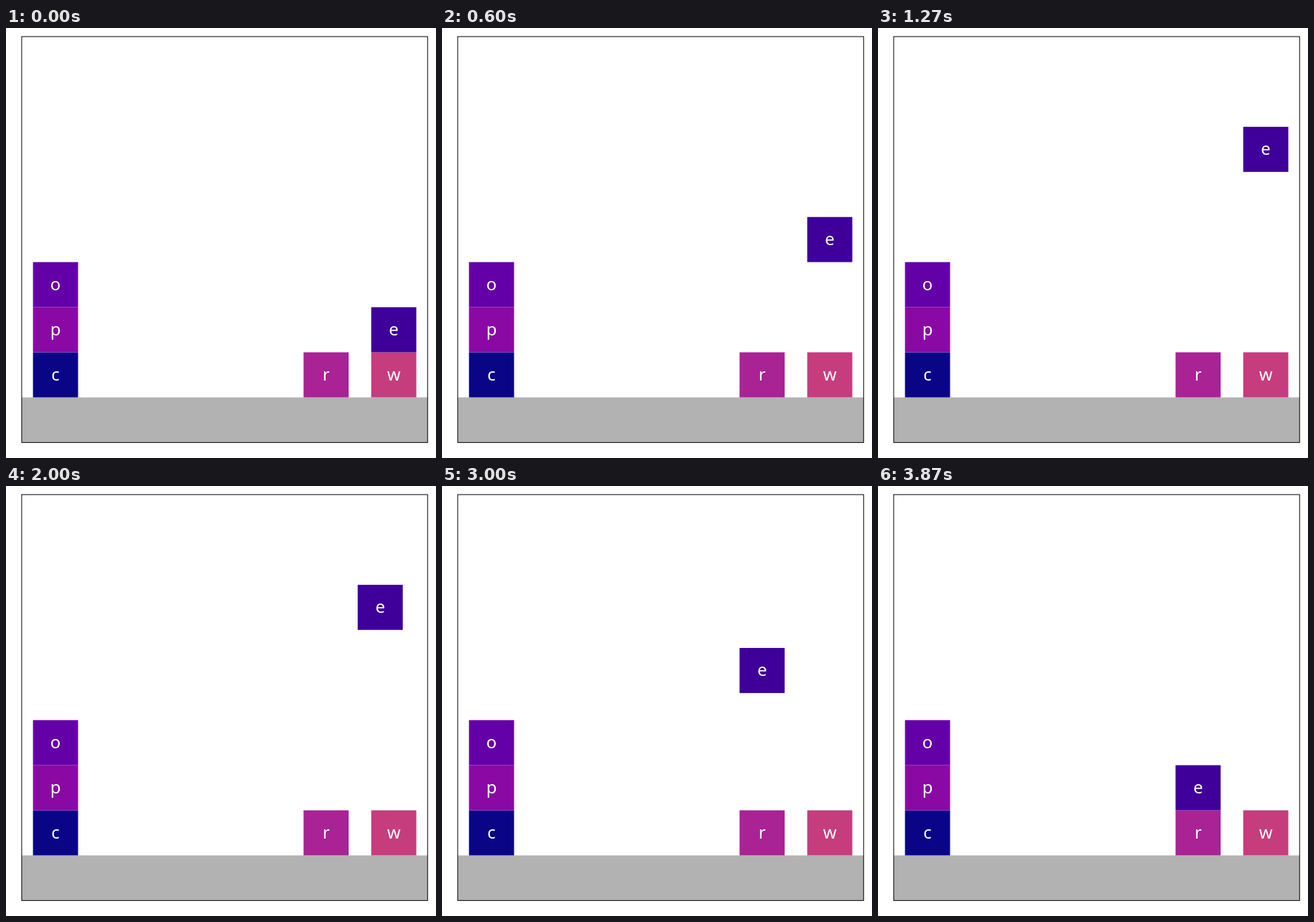
An HTML page for the animation above (3940 ms loop, 600 by 600 pixels).

```html
<!DOCTYPE html>
<html lang="en">
<head>
<meta charset="utf-8">
<title>Stacking blocks</title>
<style>
  html, body { margin: 0; width: 100%; height: 100%; overflow: hidden; background: #fff; }
  svg { display: block; width: 600px; height: 600px; }
  text { font: 24px "Noto Sans", "Open Sans", sans-serif; fill: #fff; text-anchor: middle; }
</style>
</head>
<body>
<svg id="stage" viewBox="0 0 600 600"></svg>
<script>
const LOOP = 3940, LAST = 58;
const UNIT = 62.93, LEFT = 21.9, TOP = 12, SIZE = 9 * UNIT;
const FLOOR = TOP + 8 * UNIT;
const stage = document.getElementById('stage');

function add(parent, tag, attrs, label = '') {
  const node = document.createElementNS('http://www.w3.org/2000/svg', tag);
  for (const key in attrs) node.setAttribute(key, attrs[key]);
  node.textContent = label;
  return parent.appendChild(node);
}

// Column and row are in block units; columns are 1.5 blocks apart.
function place(block, col, row) {
  const x = LEFT + (0.25 + 1.5 * col) * UNIT;
  const y = FLOOR - (row + 1) * UNIT;
  block.setAttribute('transform', `translate(${x.toFixed(2)} ${y.toFixed(2)})`);
}

function addBlock(label, fill, col, row) {
  const block = add(stage, 'g', {});
  add(block, 'rect', { width: UNIT, height: UNIT, fill });
  add(block, 'text', { x: UNIT / 2, y: UNIT / 2 + 8 }, label);
  place(block, col, row);
  return block;
}

add(stage, 'rect', { x: LEFT, y: FLOOR, width: SIZE, height: UNIT, fill: '#b2b2b2' });
add(stage, 'rect', {
  x: LEFT, y: TOP, width: SIZE, height: SIZE,
  fill: 'none', stroke: '#000', 'stroke-width': 1
});

addBlock('c', '#0a0586', 0, 0);
addBlock('p', '#8a09a5', 0, 1);
addBlock('o', '#6400a7', 0, 2);
addBlock('r', '#a92395', 4, 0);
addBlock('w', '#c53d7d', 5, 0);
const mover = addBlock('e', '#3e0099', 5, 1);

const clamp = (v, max) => Math.min(Math.max(v, 0), max);

// Lift in 20 steps, pause, shift in 10, lower in 20.
// Lift and shift each open with a double step.
function pose(tick) {
  const up = tick ? clamp(tick + 1, 20) : 0;
  const across = tick < 30 ? 0 : clamp(tick - 28, 10);
  const down = clamp(tick - 38, 20);
  place(mover, 5 - across / 10, 1 + (up - down) / 5);
}

// 15 ticks per second, with tick times rounded to 10 ms.
function draw(now) {
  const t = Math.floor((now % LOOP) / 10) * 10;
  pose(Math.min(Math.floor((t + 3.4) * 0.015), LAST));
}

let start;
function run(now) {
  start ??= now;
  draw(now - start);
  requestAnimationFrame(run);
}
draw(0);
requestAnimationFrame(run);
</script>
</body>
</html>
```
